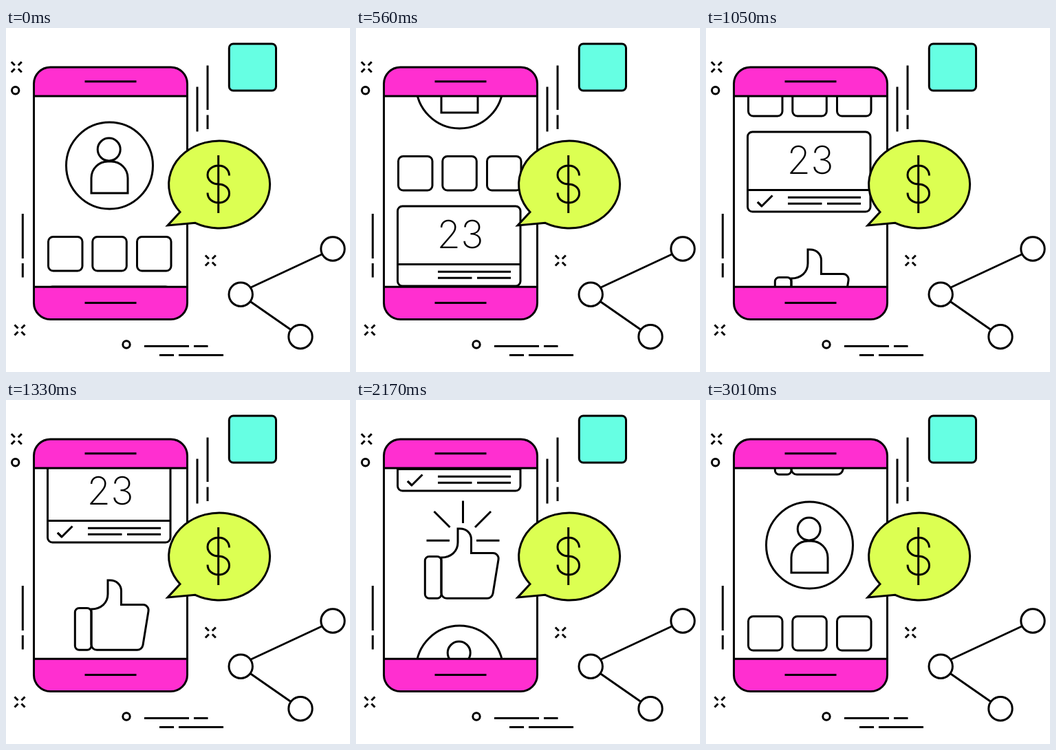
These frames come from a looping animation (500x500 px, 3080 ms). An HTML page:

```html
<!DOCTYPE html>
<html lang="en">
<head>
<meta charset="utf-8">
<title>Phone feed</title>
<style>
  html, body { margin: 0; width: 100%; height: 100%; overflow: hidden; background: #fff; }
  svg { display: block; width: 100%; height: 100%; }
  .ink { fill: none; stroke: #000; stroke-width: 3; }
  .pink { fill: #ff2fd0; stroke: none; }
  .lime { fill: #dcff52; }
  .aqua { fill: #66ffe3; }
  .count { font: 200 56px Inter, Lato, sans-serif; text-anchor: middle; fill: #000; stroke: none; }

  .feed { animation: scroll 3080ms infinite; }
  .pop { animation: show 3080ms step-end infinite; animation-delay: calc(var(--at) * 1ms - 3080ms); }

  /* The feed moves in 70 ms ticks and rests on the thumb. */
  @keyframes scroll {
    0%     { transform: translateY(0);      animation-timing-function: steps(8); }
    18.18% { transform: translateY(-117px); animation-timing-function: steps(4); }
    27.27% { transform: translateY(-180px); animation-timing-function: steps(9); }
    47.72% { transform: translateY(-315px); animation-timing-function: step-end; }
    63.63% { transform: translateY(-315px); animation-timing-function: steps(15); }
    97.72% { transform: translateY(-540px); animation-timing-function: step-end; }
    100%   { transform: translateY(-551px); }
  }
  @keyframes show {
    0%        { opacity: 1; }
    60%, 100% { opacity: 0; }
  }
</style>
</head>
<body>
<svg viewBox="0 0 500 500">
  <defs>
    <clipPath id="screen"><rect x="40" y="99" width="224" height="277"/></clipPath>
    <clipPath id="body"><rect x="40.5" y="57" width="223" height="366.5" rx="24"/></clipPath>
    <path id="spark" d="M-7.5-7.5l5 5M7.5-7.5l-5 5M-7.5 7.5l5-5M7.5 7.5l-5-5"/>
    <rect id="tile" y="303.5" width="49.5" height="49.5" rx="7"/>
    <g id="profile">
      <circle cx="150.5" cy="200" r="63"/>
      <circle cx="149.7" cy="176.5" r="16.5"/>
      <path d="M124 240V218a24 24 0 0 1 24-24h5a24 24 0 0 1 24 24v22z"/>
      <use href="#tile" x="61.5"/>
      <use href="#tile" x="125.8"/>
      <use href="#tile" x="190.5"/>
    </g>
  </defs>

  <g class="ink">
    <!-- phone -->
    <g class="pink" clip-path="url(#body)">
      <rect x="40" y="56" width="224" height="43"/>
      <rect x="40" y="376" width="224" height="48"/>
    </g>

    <g clip-path="url(#screen)">
      <g class="feed">
        <use href="#profile"/>
        <use href="#profile" y="551"/>

        <!-- card -->
        <rect x="60.5" y="376" width="178.5" height="116" rx="7"/>
        <path d="M60.5 460.5H239M119 471.3H225M119 480.3h49.5M176 480.3h49"/>
        <text class="count" x="151.5" y="437">23</text>
        <path class="pop" style="--at:700" d="M75 478l6 6"/>
        <path class="pop" style="--at:770" d="M75 478l6 6L96.5 468.5"/>

        <!-- thumb -->
        <rect x="100.3" y="587.5" width="23.7" height="60.8" rx="6"/>
        <path d="M124 589C138 589 148 580 148 567V547h3c10 0 16.5 7 16.5 15.500v20H199
                 a8 8 0 0 1 8 9.500L199 641.300a8.500 8.500 0 0 1-8.500 7H132a8 8 0 0 1-8-8z"/>
        <path class="pop" style="--at:1540" d="M102.500 564.300H136"/>
        <path class="pop" style="--at:1610" d="M113.500 522l23 23"/>
        <path class="pop" style="--at:1680" d="M155.500 506.500V539"/>
        <path class="pop" style="--at:1750" d="M196 522l-23 23"/>
        <path class="pop" style="--at:1820" d="M175 564.300h33.500"/>
      </g>
    </g>

    <rect x="40.5" y="57" width="223" height="366.5" rx="24"/>
    <path d="M40.500 99h223M40.500 376.200h223M114.500 77.800h75M114.500 399.500h75"/>

    <!-- bubble -->
    <path class="lime" d="M253 267.500A73.500 63.500 0 1 1 275 283.300L235 287z"/>
    <path d="M308.700 185v84M324.500 214.500C324.500 206 318 200 309 200S293 206 293 213.500
             300 227 309 227 324.500 233 324.500 240.500 318 254 309 254 293 248 293 239.500"/>

    <rect class="aqua" x="324.300" y="23" width="68.200" height="68" rx="6"/>

    <!-- share -->
    <path d="M356 377L460 328.500M355 397.500L414 438.500"/>
    <circle cx="475" cy="321" r="17.2"/>
    <circle cx="341.2" cy="387.2" r="17.2"/>
    <circle cx="428" cy="448.700" r="17.2"/>

    <!-- accents -->
    <path d="M278 85.500v65M293 54.500V119M293 126.500v20.500M24.300 270v65M24.300 342v20.500
             M201 462.500h65M273 462.500h20.500M223 475.500h21M251 475.500h65"/>
    <circle cx="13.700" cy="90.700" r="5.2"/>
    <circle cx="175" cy="460" r="5.2"/>
    <use href="#spark" x="15.300" y="56.700"/>
    <use href="#spark" x="297.300" y="338"/>
    <use href="#spark" x="20" y="439"/>
  </g>
</svg>
</body>
</html>
```
